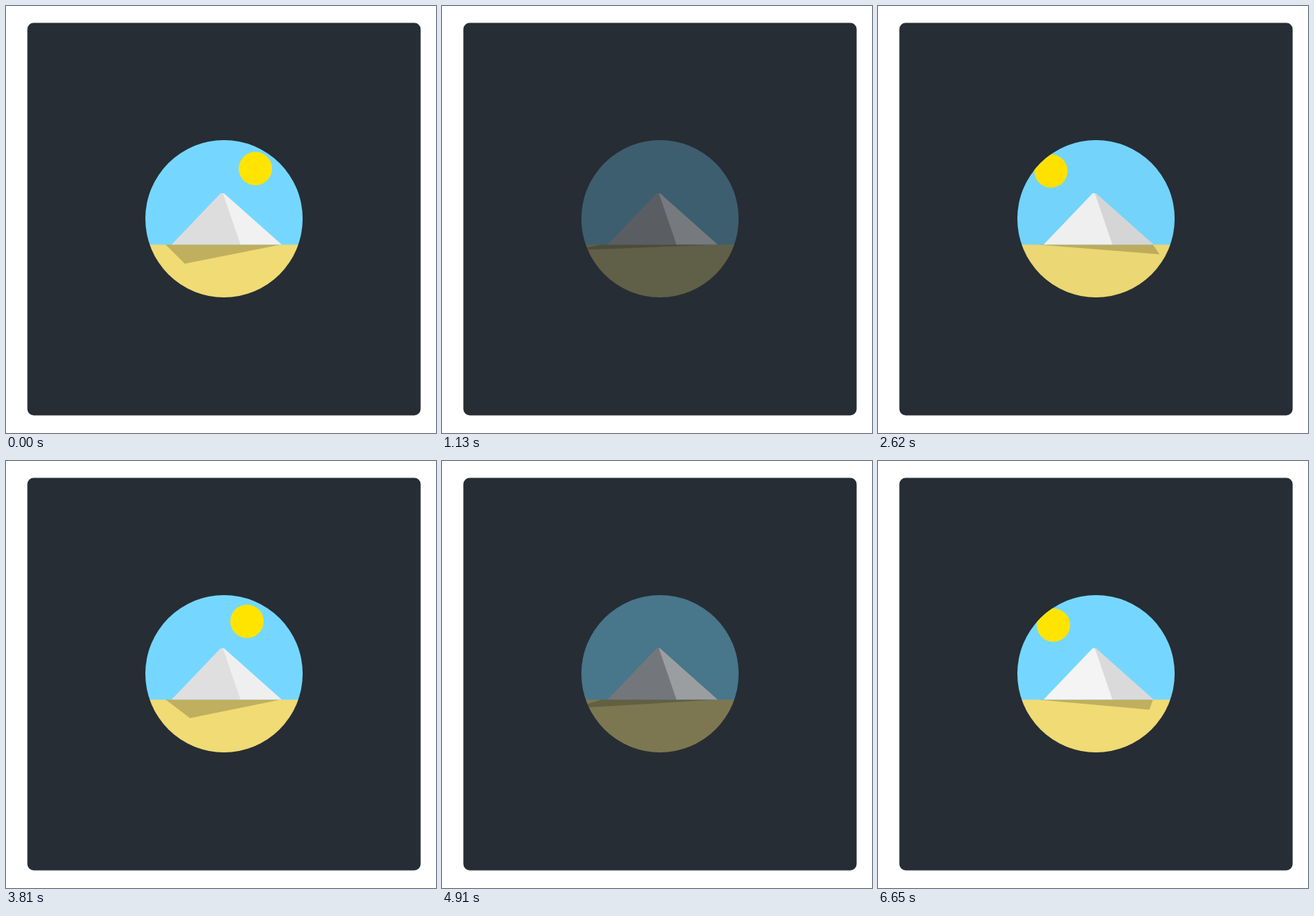
Write an HTML page that moves like this. It is 574 px wide and 570 px high and loops after 6870 ms.

```html
<!DOCTYPE html>
<html lang="en">
<head>
<meta charset="utf-8">
<title>Pyramid day and night</title>
<style>
  html, body { margin: 0; width: 100%; height: 100%; overflow: hidden; background: #fff; }
  svg { display: block; width: 574px; height: 570px; }
</style>
</head>
<body>
<svg viewBox="0 0 574 570">
  <defs>
    <clipPath id="disc"><circle cx="291" cy="284" r="105"/></clipPath>
  </defs>
  <rect x="28.5" y="22.5" width="525" height="524" rx="8.5" fill="#262d34"/>
  <g clip-path="url(#disc)">
    <rect id="sky" x="180" y="174" width="222" height="146"/>
    <circle id="sun" cx="286.5" cy="210" r="22.3"/>
    <rect id="sand" x="180" y="318.6" width="222" height="76"/>
    <polygon id="shadow" fill="#000" fill-opacity=".2"/>
    <polygon id="left" points="221,318.6 286.5,250 290,250 313.5,318.6"/>
    <polygon id="right" points="289.5,250 291,250 368,318.6 313,318.6"/>
  </g>
</svg>
<script>
const LOOP = 6870;
const HOLD = 6650;        // the last pose rests until the loop ends
const DAY = 3880;
const FIRST_PHASE = .584; // the loop opens shortly after noon
const GROUND = 318.6;

const NIGHT = [38, 45, 52];
const SKY = [117, 215, 255];
const SAND = [240, 219, 117];
const ORANGE = [245, 114, 9];
const YELLOW = [255, 228, 0];
const LIGHT = [244, 244, 244];
const SHADE = [219, 218, 218];

const el = id => document.getElementById(id);
const mix = (a, b, k) => a + (b - a) * k;
const blend = (a, b, k) => a.map((v, i) => mix(v, b[i], k));
const paint = (id, rgb) => el(id).setAttribute("fill", `rgb(${rgb.map(Math.round)})`);

// cubic-bezier(.4, 0, .49, 1), solved by bisection
function ease(x) {
  if (x <= 0) return 0;
  if (x >= 1) return 1;
  let lo = 0, hi = 1;
  for (let i = 0; i < 24; i++) {
    const t = (lo + hi) / 2, u = 1 - t;
    if (3 * u * u * t * .4 + 3 * u * t * t * .49 + t * t * t < x) lo = t;
    else hi = t;
  }
  return lo * lo * (3 - 2 * lo);
}

function draw(ms) {
  const phase = (FIRST_PHASE + Math.min(ms, HOLD) / DAY) % 1;
  const over = (from, to) => ease((phase - from) / (to - from));

  const morning = over(0, .3);
  const noon = over(.3, .7);
  const light = morning - over(.7, 1);
  const lightRight = over(.03, .3) - over(.74, 1);

  paint("sky", blend(NIGHT, SKY, light));
  paint("sand", blend(NIGHT, SAND, light));
  paint("sun", blend(ORANGE, YELLOW, light));
  paint("left", blend(NIGHT, blend(LIGHT, SHADE, noon), light));
  paint("right", blend(NIGHT, blend(SHADE, LIGHT, noon), lightRight));

  const angle = -70 + 50.4 * morning + 91.6 * over(.3, 1);
  el("sun").setAttribute("transform", `rotate(${angle} 286.5 366)`);

  const tipX = mix(417, 167, over(0, 1));
  const tipY = GROUND + mix(13.3, 27.2, noon) * light;
  el("shadow").setAttribute("points", `213,${GROUND} 367,${GROUND} ${tipX},${tipY}`);
}

const start = performance.now();
function tick() {
  draw((performance.now() - start) % LOOP);
  requestAnimationFrame(tick);
}
tick();
</script>
</body>
</html>
```
